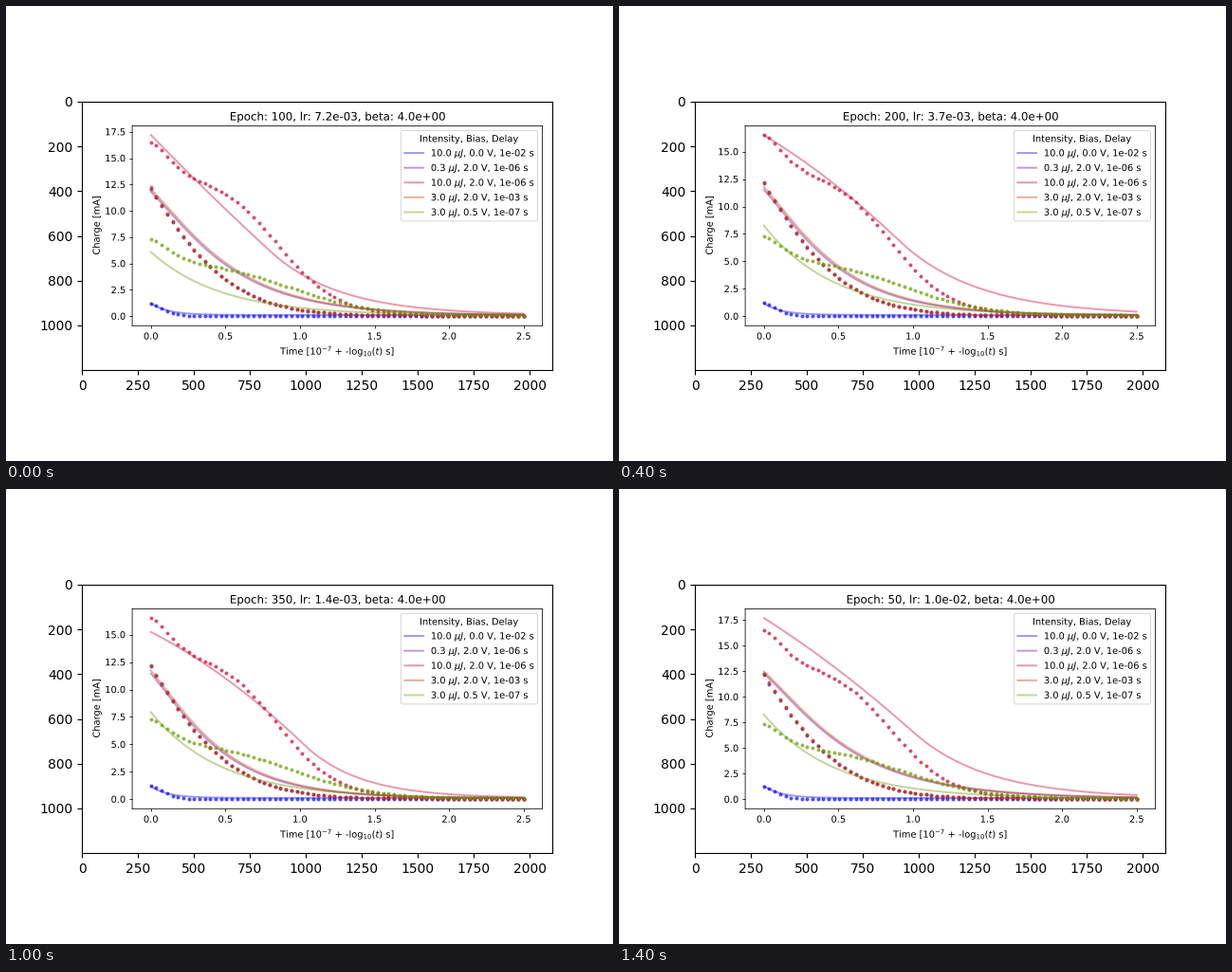
A matplotlib script for the animation above (1600 ms loop, 640x480 px).

```python
import numpy as np
import matplotlib.pyplot as plt
from matplotlib.animation import FuncAnimation
from matplotlib.patches import FancyBboxPatch
from matplotlib.patheffects import Normal

W, H = 640, 480
S = 496 / 2100 * 3            # the inset chart is a 300 dpi picture shown smaller
LEFT, RIGHT, TOP, BOTTOM = 133.1, 565.4, 126.5, 337.3
EM = 10 * S * 100 / 72

EPOCHS = [100, 150, 200, 250, 300, 350, 400, 50]
COLORS = [plt.cm.brg(i / 5) for i in range(5)]
LABELS = [r"10.0 $\mu J$, 0.0 V, 1e-02 s", r"0.3 $\mu J$, 2.0 V, 1e-06 s",
          r"10.0 $\mu J$, 2.0 V, 1e-06 s", r"3.0 $\mu J$, 2.0 V, 1e-03 s",
          r"3.0 $\mu J$, 0.5 V, 1e-07 s"]

# training state: epoch, steep curve's start, its knee (x, y), shallow curve's start
STATES = np.array([(50, 17.7, 1.0, 6.5, 8.27), (100, 17.2, .8, 6.1, 6.1),
                   (150, 16.65, .9, 6.4, 8.25), (200, 16.5, .9, 6.9, 8.27),
                   (300, 15.3, .95, 5.55, 7.8), (400, 15.2, 1.1, 4.3, 8.05)]).T
FLOOR = .08


def kneed(x, start, knee_x, knee_y, slope=13):
    """Parabola down to the knee, then an exponential tail of equal slope."""
    d = knee_x - x
    bend = (knee_y + slope * knee_x - start) / knee_x ** 2
    tail = knee_y * np.exp(np.minimum(d, 0) * slope / knee_y)
    return np.where(d > 0, knee_y + slope * d - bend * d * d, tail)


def decay(x, start, power):
    return start * np.exp(power * (.28 * (1 - np.exp(-4 * x)) - 2.4 * x))


def fits(epoch, x):
    start, knee_x, knee_y, shallow = (np.interp(epoch, STATES[0], row)
                                      for row in STATES[1:])
    settle = np.exp(-epoch / 60)
    power = .84 + .13 * np.log(epoch / 50)
    return [.12 + (1.03 + .35 * settle) * np.exp(-x / .12),
            FLOOR + decay(x, 11.37 + 1.9 * settle, power),
            FLOOR + kneed(x, start - FLOOR, knee_x, knee_y),
            FLOOR + decay(x, 11.65 + 1.7 * settle, power * .98),
            FLOOR + (shallow - FLOOR) * np.exp(-2.12 * x)]


def bump(x, width=.17):
    return np.exp(-(x / width) ** 1.6)


def sigmoid(x, level, centre, width):
    return level / (1 + np.exp((x - centre) / width))


def measurements(x):
    fall = .06 + 12.05 * np.exp(-1.97 * x - 1.1 * x * x)
    return [1.23 * bump(x, .12) - .03 + .07 * np.tanh(x),
            fall,
            .06 + sigmoid(x, 13.5, .85, .2) + 3.15 * bump(x),
            fall + .12 * np.exp(-x / .4),
            .04 + sigmoid(x, 5.4, .93, .28) + 2.05 * bump(x)]


fig = plt.figure(figsize=(W / 100, H / 100), dpi=100)
outer = fig.add_subplot()
outer.set(xlim=(-.5, 2099.5), ylim=(1199.5, -.5), aspect="equal")

ax = fig.add_axes([LEFT / W, 1 - BOTTOM / H, (RIGHT - LEFT) / W, (BOTTOM - TOP) / H])
ax.set_xlim(-.125, 2.625)
x_ticks = np.arange(0, 2.6, .5)
ax.set_xticks(x_ticks)
ax.tick_params(length=3.5 * S, width=.8 * S, labelbottom=False, labelleft=False)
for spine in ax.spines.values():
    spine.set(linewidth=.8 * S, snap=False)


def text(x, y, s, size=10, ha="center", rotation=0):
    # path effects draw the glyphs as outlines, free of the pixel grid
    return fig.text(x / W, 1 - y / H, s, size=size * S, ha=ha, va="baseline",
                    rotation=rotation, rotation_mode="anchor",
                    path_effects=[Normal()])


mid_x, mid_y = (LEFT + RIGHT) / 2, (TOP + BOTTOM) / 2
title = text(mid_x, TOP - .6 * EM, "", 12)
text(mid_x + .8, 367.7, r"Time [$10^{-7}$ + -log$_{10}(t)$ s]")
text(98.7, mid_y - .7, "Charge [mA]", rotation=90)
for v in x_ticks:
    text(LEFT + (v + .125) / 2.75 * (RIGHT - LEFT), 351.7, f"{v:.1f}")
y_values = np.arange(0, 17.6, 2.5)
y_labels = [text(LEFT - .7 * EM, 0, f"{v:.1f}", ha="right") for v in y_values]

x_fit = np.linspace(0, 2.5, 200)
x_dots = np.linspace(0, 2.5, 70)
lines = []
for color, dots in zip(COLORS, measurements(x_dots)):
    lines += ax.plot(x_fit, x_fit, color=color, alpha=.4, lw=2 * S)
    ax.plot(x_dots, dots, "o", color=color, alpha=.7, ms=4 * S, mew=0)

# legend, laid out in pixels
key = fig.add_axes([0, 0, 1, 1])
key.set(xlim=(0, W), ylim=(H, 0))
key.axis("off")
box_l, box_r, box_t, box_b = 416.4, RIGHT - EM / 2, TOP + EM / 2, 226.9
key.add_patch(FancyBboxPatch((box_l, box_t), box_r - box_l, box_b - box_t,
                             boxstyle=f"round,pad=0,rounding_size={.2 * EM}",
                             fc="white", ec="0.8", lw=S, alpha=.8))
text((box_l + box_r) / 2, 143.3, "Intensity, Bias, Delay")
for k, label in enumerate(LABELS):
    base = 158.5 + 15.6 * k
    x0 = box_l + .4 * EM
    key.plot([x0, x0 + 2 * EM], [base - .35 * EM] * 2, color=COLORS[k],
             alpha=.4, lw=2 * S, snap=False)
    text(x0 + 2.8 * EM, base, label, ha="left")


def update(i):
    epoch = EPOCHS[i]
    rate = .01 * .7178 ** (epoch / 50 - 1)
    title.set_text(f"Epoch: {epoch}, lr: {rate:.1e}, beta: 4.0e+00")
    curves = fits(epoch, x_fit)
    for line, y in zip(lines, curves):
        line.set_ydata(y)
    low, high = -.04, max(16.52, curves[2][0])
    margin = .05 * (high - low)
    bottom, top = low - margin, high + margin
    ax.set_yticks(y_values[y_values < top])
    ax.set_ylim(bottom, top)
    for label, v in zip(y_labels, y_values):
        y = BOTTOM - (v - bottom) / (top - bottom) * (BOTTOM - TOP)
        label.set_y(1 - (y + .365 * EM) / H)
        label.set_visible(v < top)
    for axis in (ax.xaxis, ax.yaxis):
        for tick in axis.get_ticklines():
            tick.set_snap(False)
    return lines


anim = FuncAnimation(fig, update, frames=len(EPOCHS), interval=200,
                     init_func=lambda: lines, repeat=True, repeat_delay=0)
plt.show()
```
